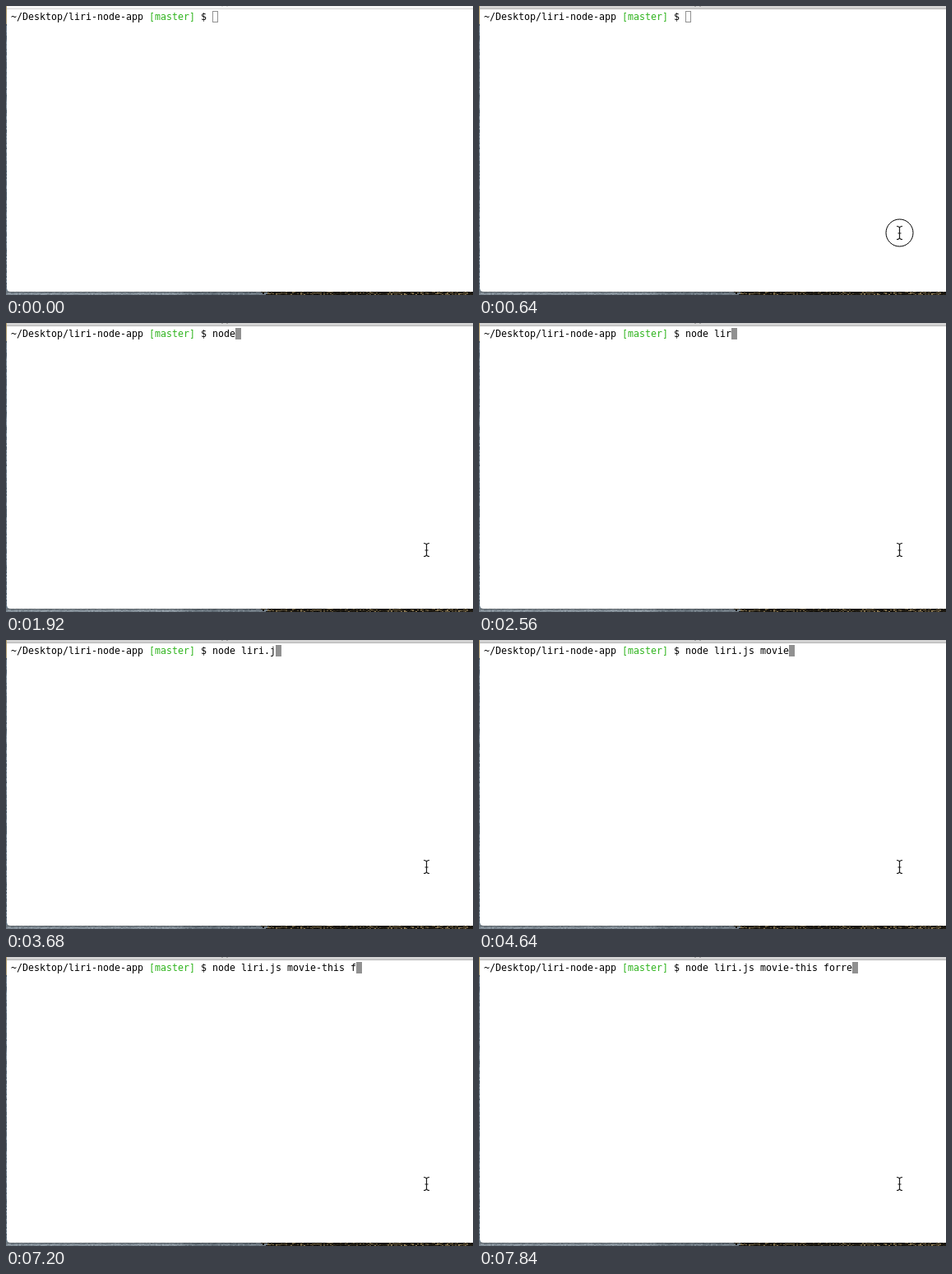
These frames come from a looping animation (568 by 351 pixels, 8 s). An HTML page with a canvas:

```html
<!DOCTYPE html>
<html lang="en">
<head>
<meta charset="utf-8">
<title>Terminal</title>
<style>
html, body { margin: 0; width: 100%; height: 100%; overflow: hidden; background: #fff; }
canvas { display: block; width: 568px; height: 351px; }
</style>
</head>
<body>
<canvas id="stage" width="568" height="351"></canvas>
<script>
const W = 568, H = 351, LOOP = 8000, STEP = 160;
const CELL = 7, LEFT = 6, TOP = 6, LINE = 14, BASE = 17;
const PROMPT = [['~/Desktop/liri-node-app ', '#000'], ['[master]', '#2fb41d'], [' $ ', '#000']];
const COMMAND = 'node liri.js movie-this forre';
const FOCUS = 640, READY = 800;

// Bursts of typing: start time, then characters added at each step
const BURSTS = [
  [1440, 1, 1, 1, 1, 1, 1, 1],
  [2560, 1, 1],
  [3040, 1],
  [3680, 1, 1, 1, 2, 1, 1, 1],
  [5120, 1, 1, 2, 1, 1],
  [7200, 1, 2],
  [7680, 1, 1]
];

const ctx = document.getElementById('stage').getContext('2d');
const desktop = paintDesktop();

function rect(c, color, x, y, w, h) {
  c.fillStyle = color;
  c.fillRect(x, y, w, h);
}

function randomizer(seed) {
  return () => (seed = (seed * 16807) % 2147483647) / 2147483647;
}

// Water on the left, rocks on the right
function paintDesktop() {
  const layer = document.createElement('canvas');
  layer.width = W;
  layer.height = H;
  const c = layer.getContext('2d');
  const rand = randomizer(4711);

  const sky = c.createLinearGradient(0, 0, 0, H);
  sky.addColorStop(0, '#b39a62');
  sky.addColorStop(0.06, '#a89a78');
  sky.addColorStop(0.09, '#65788a');
  sky.addColorStop(0.5, '#52677a');
  sky.addColorStop(1, '#7c8b96');
  rect(c, sky, 0, 0, W, H);
  for (let y = 22; y < H; y += 2) {
    const v = 65 + rand() * 65;
    rect(c, `rgb(${v}, ${v + 16}, ${v + 30})`, 0, y, 1, 2);
  }

  for (let y = 346; y < H; y++) {
    for (let x = 0; x < W; x += 2) {
      const shore = 306 + 12 * rand();
      if (x < shore) {
        const v = 112 + 34 * rand() - (x > 215 ? 22 : 0);
        rect(c, `rgb(${v}, ${v + 11}, ${v + 20})`, x, y, 2, 1);
      } else {
        const lit = rand() < (x > 460 ? 0.4 : 0.25);
        const v = lit ? 75 + 75 * rand() : 14 + 28 * rand();
        rect(c, `rgb(${v}, ${v * 0.87}, ${v * 0.6})`, x, y, 2, 1);
      }
    }
  }
  rect(c, 'rgba(0, 0, 0, 0.3)', 0, 347, W, 1);
  return layer;
}

function drawWindow(focused) {
  ctx.drawImage(desktop, 0, 0);
  ctx.fillStyle = '#fff';
  ctx.beginPath();
  ctx.moveTo(1, 0);
  ctx.lineTo(W, 0);
  ctx.lineTo(W, 347);
  ctx.lineTo(6, 347);
  ctx.quadraticCurveTo(1, 347, 1, 342);
  ctx.fill();
  rect(ctx, focused ? '#d3d3d3' : '#f6f6f6', 1, 0, W, 3);
  rect(ctx, focused ? '#b4b4b4' : '#d4d4d4', 1, 3, W, 1);
  const speck = focused ? '#a2a2a2' : '#dedede';
  rect(ctx, speck, 262, 0, 2, 1);
  rect(ctx, speck, 268, 0, 2, 1);
}

function drawText(text, color, col) {
  ctx.fillStyle = color;
  [...text].forEach((ch, i) => ctx.fillText(ch, LEFT + (col + i) * CELL, BASE));
  return col + text.length;
}

function typedCount(t) {
  let n = 0;
  for (const [start, ...adds] of BURSTS) {
    adds.forEach((add, i) => { if (t >= start + i * STEP) n += add; });
  }
  return n;
}

function drawLine(t) {
  ctx.font = '11.6px "DejaVu Sans Mono", monospace';
  ctx.textBaseline = 'alphabetic';
  let col = 0;
  for (const [text, color] of PROMPT) col = drawText(text, color, col);
  col = drawText(COMMAND.slice(0, typedCount(t)), '#000', col);
  const x = LEFT + col * CELL;
  if (t >= READY) {
    rect(ctx, '#919191', x, TOP, CELL, LINE);
  } else {
    ctx.strokeStyle = '#919191';
    ctx.lineWidth = 1;
    ctx.strokeRect(x + 0.5, TOP + 0.5, CELL - 1, LINE - 1);
  }
}

function drawBeam(x, y) {
  ctx.beginPath();
  for (const s of [-1, 1]) {
    ctx.moveTo(x - 3.5, y + 8 * s);
    ctx.quadraticCurveTo(x, y + 8 * s, x, y + 5.5 * s);
    ctx.quadraticCurveTo(x, y + 8 * s, x + 3.5, y + 8 * s);
  }
  ctx.moveTo(x, y - 6);
  ctx.lineTo(x, y + 6);
  ctx.moveTo(x - 2, y + 0.5);
  ctx.lineTo(x + 2, y + 0.5);
  ctx.strokeStyle = '#1c1c1c';
  ctx.lineWidth = 1.2;
  ctx.stroke();
}

function drawPointer(t) {
  if (t < 320) return;
  const away = t < 480 ? 1 : 0;
  const x = 511.5 + 6 * away, y = 275.5 + 14 * away;
  if (t >= FOCUS && t < READY) {
    ctx.beginPath();
    ctx.arc(x, y, 16.5, 0, Math.PI * 2);
    ctx.strokeStyle = '#000';
    ctx.lineWidth = 1;
    ctx.stroke();
  }
  drawBeam(x, y);
}

const begin = performance.now();

function frame() {
  const t = (performance.now() - begin) % LOOP;
  drawWindow(t >= FOCUS);
  drawLine(t);
  drawPointer(t);
  requestAnimationFrame(frame);
}
frame();
</script>
</body>
</html>
```
